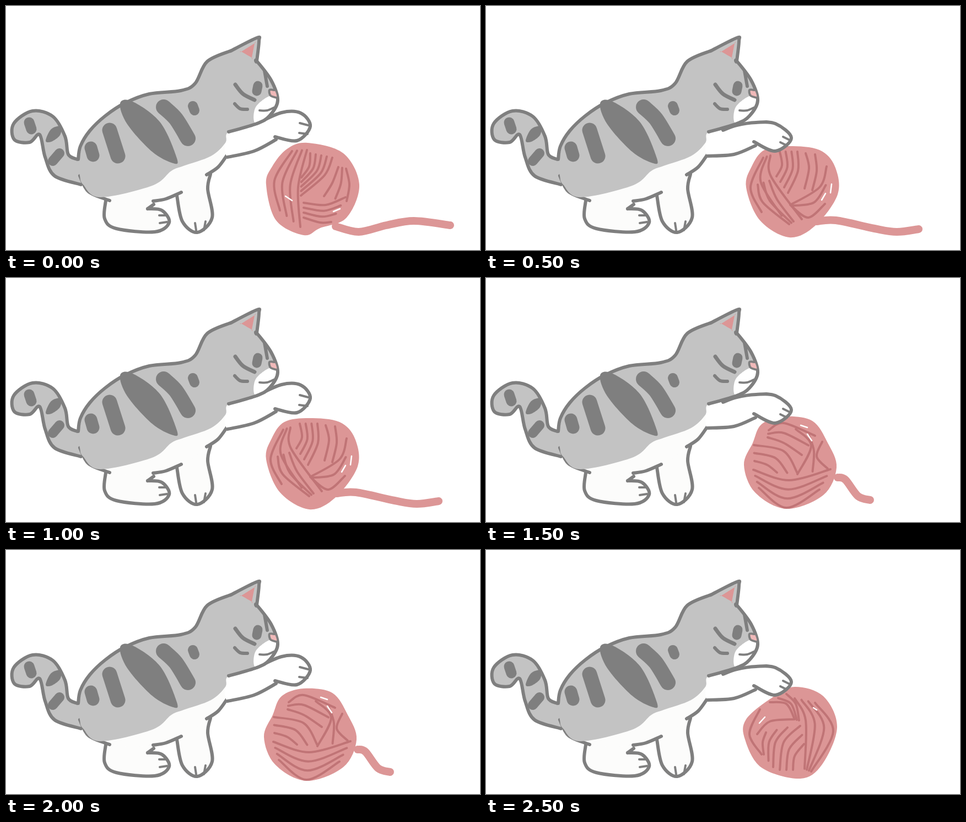
Write an HTML page with a canvas that moves like this. It is 860 px wide and 444 px high and loops after 3000 ms.

```html
<!DOCTYPE html>
<html lang="en">
<head>
<meta charset="utf-8">
<title>Kitten and yarn</title>
<style>
html, body { margin: 0; width: 100%; height: 100%; overflow: hidden; background: #fff; }
canvas { display: block; }
</style>
</head>
<body>
<canvas id="stage" width="860" height="444"></canvas>
<script>
const ctx = document.getElementById('stage').getContext('2d');
const DARK = '#7f7f7f', GREY = '#c3c3c3', FUR = '#fcfcfb', WHITE = '#fff';
const PINK = '#dc9696', STRAND = '#c07476';
const STEP = 500;

ctx.lineCap = ctx.lineJoin = 'round';

const parse = text => text.split(' ').map(Number);

// Smooth curve through "x y x y ..." points; a repeated point makes a corner.
function trace(n, closed) {
  const count = n.length / 2;
  const at = i => {
    const k = closed ? (i + count) % count : Math.max(0, Math.min(count - 1, i));
    return [n[2 * k], n[2 * k + 1]];
  };
  ctx.beginPath();
  ctx.moveTo(...at(0));
  for (let i = 0; i < count - !closed; i++) {
    const [a, b, c, d] = [at(i - 1), at(i), at(i + 1), at(i + 2)];
    ctx.bezierCurveTo(
      b[0] + (c[0] - a[0]) / 6, b[1] + (c[1] - a[1]) / 6,
      c[0] - (d[0] - b[0]) / 6, c[1] - (d[1] - b[1]) / 6, ...c);
  }
}

function fill(points, color) {
  trace(parse(points), true);
  ctx.fillStyle = color;
  ctx.fill();
}

function stroke(numbers, color, width) {
  trace(numbers, false);
  ctx.strokeStyle = color;
  ctx.lineWidth = width;
  ctx.stroke();
}

const line = (points, width = 6, color = DARK) => stroke(parse(points), color, width);
const yarn = points => line(points, 14, PINK);
const fleck = points => line(points, 2.5, WHITE);

// Evenly spaced strands that blend from one curve into another.
function fan(count, first, last = first) {
  const a = parse(first), b = parse(last);
  for (let i = 0; i < count; i++) {
    const k = i / Math.max(1, count - 1);
    stroke(a.map((v, j) => v + (b[j] - v) * k), STRAND, 4);
  }
}

function drawTail() {
  const edge = '129 279 113 270 107 237 85 201 48 191 14 214 15 243 43 248 61 234 71 275 88 309 136 325';
  fill(edge + ' 150 300', GREY);
  line('42 212 46 224', 19);
  fill('72 245 82 224 99 219 98 235 82 247', DARK);
  line('85 282 97 268', 18);
  line(edge);
}

function drawLegs() {
  const hind = '181 354 179 387 200 405 270 411 296 394 283 372 257 369';
  const fore = '310 345 320 392 347 412 374 385 366 333 371 306';
  fill(hind + ' 268 340', FUR);
  fill(fore + ' 340 300', FUR);
  fill('404 229 402 270 364 307 318 339 225 358 150 325', FUR);
  line(hind);
  line(fore);
  line('134 309 150 338 188 354');
  line('267 355 290 351 318 339');
  line('257 369 268 361');
  line('364 307 385 293 402 270');
  line('343 395 345 408', 4);
  line('362 392 359 408', 4);
  line('278 381 292 381', 4);
  line('279 395 292 393', 4);
}

function drawCoat() {
  const outline = '131 279 135 255 152 227 180 200 215 177 260 160 317 154 343 141 365 101 409 81 409 81 455 58 459 64 455 100 455 100 481 135 493 172 478 200 455 214 404 229';
  fill(outline + ' 398 249 372 273 322 291 300 300 265 327 171 348 140 325 134 309', GREY);
  fill('480 163 453 184 452 213 478 200 493 172', WHITE);

  line('154 258 158 272', 23);
  line('188 226 203 273', 27);
  fill('207 177 230 174 280 212 310 277 303 286 265 265 220 215', DARK);
  line('286 184 308 205 330 241', 28);
  line('339 182 342 190', 18);

  fill('427 83 427 83 451 68 451 68 446 94 446 94', PINK);
  line('455 155 457 145', 17);
  line('416 143 430 160 451 171', 7);
  line('415 178 425 187 438 188');
  line('469 118 474 146');
  line(outline);
  fill('478 153 487 153 491 166 479 162', '#f0b9b9');
  line('487 153 478 153 480 163 491 167', 4);
  line('460 190 474 190 488 184', 4);
}

function drawArm(paw, under) {
  fill(paw + ' ' + under + ' 404 229', WHITE);
  line(paw);
  line(under);
}

function liftPaw() {
  drawArm('455 214 500 194 535 195 552 219 528 245 488 238', '490 243 450 264 402 275');
  line('533 213 548 217', 4);
  line('532 231 547 233', 4);
}

function dropPaw() {
  drawArm('430 226 455 217 490 212 525 214 554 240 525 264 486 247', '489 254 450 270 402 273');
  line('539 238 551 244', 4);
  line('534 248 546 254', 4);
}

function freshBall() {
  yarn('598 401 640 411 690 399 740 391 806 399');
  fill('547 249 612 268 641 325 618 385 570 404 540 417 490 390 472 325 483 292 510 260', PINK);
  fan(4, '519 264 487 318 497 372', '546 262 530 330 534 402');
  fan(5, '552 268 550 292 536 312', '592 276 578 308 535 345');
  fan(3, '603 293 592 322 577 346', '617 296 623 325 618 355');
  fan(4, '540 358 580 362 616 348', '540 385 570 394 590 393');
  fleck('507 346 519 354');
  fleck('594 374 606 369');
}

function nudgedBall() {
  yarn('600 392 635 390 705 405 745 411 785 406');
  fill('550 255 605 262 633 292 638 343 597 400 550 421 497 390 472 330 482 292 505 262', PINK);
  fan(3, '503 276 480 330 500 375', '516 272 517 310 573 388');
  fan(3, '493 325 502 357 550 397', '514 318 528 352 558 392');
  fan(4, '533 265 537 290 527 310', '565 265 566 300 548 340');
  fan(2, '580 268 586 295 578 332', '597 270 600 300 592 335');
  fan(3, '618 292 605 330 552 362', '615 360 585 385 555 365');
  fleck('627 324 625 340');
  fleck('609 353 616 341');
}

function turnedBall() {
  yarn('638 363 652 367 675 397 697 404');
  fill('540 252 592 260 620 300 636 345 612 395 545 420 488 390 468 340 484 300 500 266', PINK);
  fan(3, '513 277 540 264 597 287', '511 290 540 300 573 322');
  fan(3, '486 304 540 315 565 355', '487 333 510 340 528 354');
  fan(3, '562 275 590 305 565 357', '610 298 600 325 620 347');
  fan(4, '485 349 550 368 625 348', '495 382 545 418 605 385');
  fleck('571 268 583 272');
  fleck('583 284 591 296');
}

function woundBall() {
  fill('560 249 612 266 637 322 610 390 570 416 500 396 470 345 472 308 520 268', PINK);
  fan(3, '515 277 545 280 560 308', '545 262 562 280 568 310');
  fan(1, '492 335 515 312 560 308');
  fan(1, '497 290 478 335 500 372');
  fan(3, '508 332 502 350 504 372', '547 323 525 350 521 395');
  fan(3, '570 320 540 350 533 400', '577 353 560 375 557 400');
  fan(4, '560 270 580 310 578 398', '597 278 630 330 590 403');
  fleck('496 315 506 304');
  fleck('594 287 600 291');
}

const balls = [freshBall, nudgedBall, turnedBall, woundBall];

function draw(now) {
  const beat = Math.floor(now / STEP) % 6;
  ctx.fillStyle = WHITE;
  ctx.fillRect(0, 0, 860, 444);
  balls[Math.ceil(beat / 2)]();
  drawTail();
  drawLegs();
  (beat % 2 ? dropPaw : liftPaw)();
  drawCoat();
  requestAnimationFrame(draw);
}
requestAnimationFrame(draw);
</script>
</body>
</html>
```
